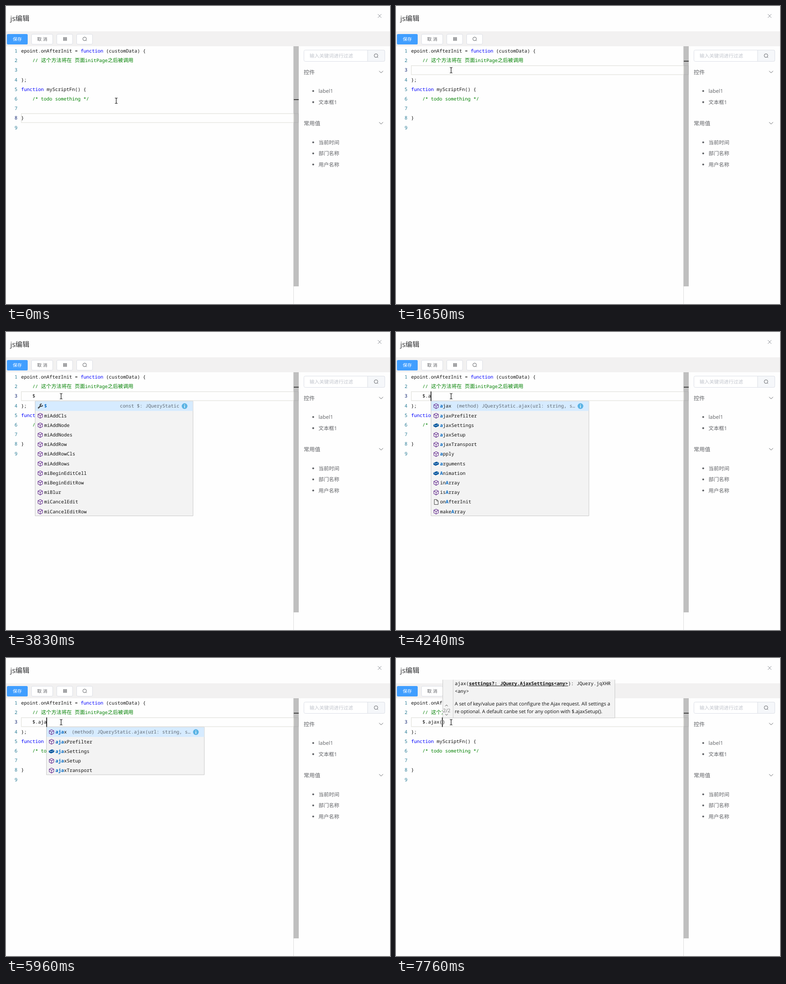
Recreate the animation shown at these times as an HTML page with a canvas. Size 850x659 px, loop 8000 ms.

```html
<!DOCTYPE html>
<html lang="zh-CN">
<head>
<meta charset="utf-8">
<title>js编辑</title>
<style>
html, body { margin: 0; width: 100%; height: 100%; overflow: hidden; background: #fefefe; }
canvas { display: block; width: 850px; height: 659px; }
</style>
</head>
<body>
<canvas id="stage" width="850" height="659"></canvas>
<script>
const ctx = document.getElementById('stage').getContext('2d');
const LOOP = 8000;
const CHAR = 6.27, WIDE = 11.4, ROW = 21.2, LEFT = 33.5;
const MONO = '"Noto Sans Mono", "DejaVu Sans Mono", monospace';
const SANS = '"Open Sans", "Noto Sans CJK SC", "Noto Sans CJK", sans-serif';
const CJK = '"Noto Sans CJK SC", "Noto Sans CJK", sans-serif';
const BLUE = '#0000ff', GREEN = '#008000', INK = '#111111', GREY = '#606266';

const rowY = n => 99.2 + ROW * (n - 1);

function box(x, y, w, h, fill, stroke, r = 0) {
  ctx.beginPath();
  ctx.roundRect(x, y, w, h, r);
  if (fill) { ctx.fillStyle = fill; ctx.fill(); }
  if (stroke) { ctx.strokeStyle = stroke; ctx.lineWidth = 1; ctx.stroke(); }
}

function path(points, color, width = 1, fill) {
  ctx.beginPath();
  points.forEach(([x, y], i) => i ? ctx.lineTo(x, y) : ctx.moveTo(x, y));
  if (fill) { ctx.closePath(); ctx.fillStyle = fill; ctx.fill(); }
  if (color) { ctx.strokeStyle = color; ctx.lineWidth = width; ctx.stroke(); }
}

function disc(x, y, r, fill, stroke) {
  ctx.beginPath();
  ctx.arc(x, y, r, 0, Math.PI * 2);
  if (fill) { ctx.fillStyle = fill; ctx.fill(); }
  if (stroke) { ctx.strokeStyle = stroke; ctx.lineWidth = 1; ctx.stroke(); }
}

function label(str, x, cy, size, color, align = 'left', weight = 400) {
  ctx.font = `${weight} ${size}px ${SANS}`;
  ctx.fillStyle = color;
  ctx.textAlign = align;
  ctx.fillText(str, x, cy + size * 0.37);
}

// Monospaced text with wide characters; returns the end position.
const isWide = s => /[\u3000-\uffff]/.test(s);
const runWidth = s => s.length * (isWide(s) ? WIDE : CHAR);
const runs = s => s.match(/[\u3000-\uffff]+|[^\u3000-\uffff]+/g) || [];
const codeWidth = s => runs(s).reduce((w, r) => w + runWidth(r), 0);

function code(str, x, cy, color = INK, weight = 400) {
  ctx.textAlign = 'left';
  ctx.fillStyle = color;
  for (const run of runs(str)) {
    ctx.font = isWide(run) ? `${weight} ${WIDE}px ${CJK}` : `${weight} 10.45px ${MONO}`;
    ctx.fillText(run, x, cy + 3.7);
    x += runWidth(run);
  }
  return x;
}

const lines = [
  [['epoint.onAfterInit = '], ['function', BLUE], [' (customData) {']],
  [['    // 这个方法将在 页面initPage之后被调用', GREEN]],
  [],
  [['};']],
  [['function', BLUE], [' myScriptFn() {']],
  [['    /* todo something */', GREEN]],
  [],
  [['}']],
  []
];

// Suggestion entries: icon letter, then name.
const toItems = s => s.split(' ').map(e => [e[0], e.slice(2)]);
const AJAX = 'm:ajax m:ajaxPrefilter f:ajaxSettings m:ajaxSetup m:ajaxTransport';
const AJAX_INFO = '(method) JQueryStatic.ajax(url: string, s…';
const globals = {
  info: 'const $: JQueryStatic',
  items: toItems('w:$ m:miAddCls m:miAddNode m:miAddNodes m:miAddRow m:miAddRowCls m:miAddRows ' +
    'm:miBeginEditCell m:miBeginEditRow m:miBlur m:miCancelEdit m:miCancelEditRow')
};
const members = {
  info: AJAX_INFO,
  items: toItems(AJAX + ' f:Animation m:apply f:arguments m:bind m:call f:caller m:camelCase')
};
const startA = {
  info: AJAX_INFO,
  items: toItems(AJAX + ' m:apply f:arguments f:Animation m:inArray m:isArray p:onAfterInit m:makeArray')
};
const ajaxOnly = { info: AJAX_INFO, items: toItems(AJAX) };

// Time, typed text, caret shown, suggestion list, prefix the list belongs to.
const steps = [
  [0, '', 0],
  [1130, '', 1], [1650, '', 0],
  [2180, '¥', 1], [2270, '¥。', 1], [2700, '¥', 1], [2880, '', 1],
  [3380, '$', 1], [3430, '$', 1, globals, '$'], [3830, '$', 0, globals, '$'],
  [4040, '$.', 1], [4100, '$.', 1, members, '$.'],
  [4210, '$.a', 1, members, '$.'], [4240, '$.a', 1, startA, '$.a'],
  [4300, '$.aj', 1, startA, '$.a'], [4330, '$.aj', 1, ajaxOnly, '$.aj'],
  [4390, '$.ajj', 1], [4820, '$.aj', 1], [4940, '$.a', 1], [5220, '$.', 1],
  [5720, '$.a', 1], [5780, '$.a', 1, startA, '$.a'],
  [5840, '$.aj', 1, ajaxOnly, '$.aj'], [5930, '$.aja', 1, ajaxOnly, '$.aj'],
  [5960, '$.aja', 1, ajaxOnly, '$.aja'],
  [6110, '$.ajax', 1, ajaxOnly, '$.aja'], [6140, '$.ajax', 1, ajaxOnly, '$.ajax'],
  [6630, '$.ajax', 0, ajaxOnly, '$.ajax'],
  [6810, '$.ajax()', 1], [7270, '$.ajax()', 0], [7760, '$.ajax()', 1]
];
const CLICK = 1130, TIP = 6900;

function magnifier(x, y) {
  disc(x, y, 4, null, GREY);
  path([[x + 2.8, y + 2.8], [x + 4.6, y + 4.6]], GREY);
}

function chevron(x, y, w, h, color) {
  path([[x - w, y - h], [x, y + h], [x + w, y - h]], color);
}

function drawFrame() {
  box(0, 0, 850, 659, '#fefefe');
  label('js编辑', 9.5, 27, 15.5, '#303133');
  path([[823, 18], [831, 26]], '#909399');
  path([[831, 18], [823, 26]], '#909399');

  box(0, 56, 850, 33, '#f2f1f1');
  box(2, 62, 46, 23, '#409eff', null, 2.5);
  label('保存', 25, 73.2, 10, '#fff', 'center', 500);
  for (const [x, w] of [[56.5, 47], [112.5, 35], [156.5, 35]]) box(x, 62.5, w, 22, '#fff', '#dcdfe6', 2.5);
  label('取 消', 80.3, 73.2, 10, GREY, 'center');
  for (let i = 0; i < 9; i++) box(126.8 + (i % 3) * 2.9, 69.3 + Math.floor(i / 3) * 2.7, 2.1, 1.9, '#505256');
  magnifier(174, 72.7);
}

function drawSidebar() {
  box(659.5, 97.5, 179, 25, '#fff', '#dcdfe6', 3);
  box(800.5, 97.5, 38, 25, '#f5f7fa', '#dcdfe6', [0, 3, 3, 0]);
  label('输入关键词进行过滤', 672, 109.8, 10.7, '#c0c4cc');
  magnifier(819, 109.7);
  for (const [name, y] of [['控件', 146.3], ['常用值', 259.5]]) {
    label(name, 659, y, 12.3, GREY);
    chevron(830.3, y - 0.5, 4.3, 2.2, GREY);
  }
  const entries = [['label1', 188], ['文本框1', 212.7], ['当前时间', 301.5], ['部门名称', 326], ['用户名称', 350.5]];
  for (const [name, y] of entries) {
    disc(680, y, 2.1, GREY);
    label(name, 691.7, y, 11.5, GREY);
  }
}

function drawEditor(text, active) {
  box(636, 89, 1, 570, '#dddddd');
  box(636.5, 89, 11.5, 531, '#bfbfbf');
  box(637, 87 + 17 * (active - 1), 11, 2, '#424242');
  const top = rowY(active) - 9.7;
  ctx.strokeStyle = '#e6e6e2';
  ctx.lineWidth = 1.5;
  ctx.strokeRect(34, top, 602.5, 19.8);
  path([[636.5, top], [647.3, top], [647.3, top + 19.8], [636.5, top + 19.8]], '#b0b0b0');

  lines.forEach((parts, i) => {
    const n = i + 1, y = rowY(n);
    code(String(n), 19, y, n === active ? '#0b216f' : '#237893');
    let x = LEFT;
    for (const [str, color] of parts) x = code(str, x, y, color);
  });
  code('    ' + text, LEFT, rowY(3));
}

function icon(kind, x, y) {
  if (kind === 'm') {
    const a = [x, y - 5.5], b = [x + 5, y - 3], c = [x + 5, y + 2.7], d = [x, y + 5.5], e = [x - 5, y + 2.7], f = [x - 5, y - 3];
    path([a, b, c, d, e, f, a], '#652d90', 1.1);
    path([f, [x, y - 0.3], b], '#652d90', 1.1);
    path([[x, y - 0.3], d], '#652d90', 1.1);
  } else if (kind === 'f') {
    path([[x - 6, y - 1.5], [x + 1, y - 4.5], [x + 6, y - 2.5], [x + 6, y + 1.5], [x - 1, y + 4.5], [x - 6, y + 2.2]], null, 1, '#00539c');
    path([[x - 5, y - 0.9], [x - 1, y + 0.8], [x + 5.2, y - 1.8]], '#e8f1f8', 0.9);
  } else if (kind === 'w') {
    path([[x - 4.8, y + 4.8], [x + 1.5, y - 1.3]], '#424242', 2.6);
    ctx.beginPath();
    ctx.arc(x + 2.4, y - 2.2, 2.6, -0.1, Math.PI * 1.6);
    ctx.lineWidth = 2;
    ctx.stroke();
  } else {
    path([[x - 4, y - 5.5], [x + 1.5, y - 5.5], [x + 4.5, y - 2.5], [x + 4.5, y + 5.5], [x - 4, y + 5.5], [x - 4, y - 5.5]], '#424242');
    path([[x + 1.3, y - 5.5], [x + 1.3, y - 2.3], [x + 4.5, y - 2.3]], '#424242');
  }
}

function drawList({ info, items }, prefix) {
  const x = Math.floor(LEFT + CHAR * 4 + codeWidth(prefix)) + 0.5, y = 153.3;
  const word = prefix.slice(prefix.indexOf('.') + 1);
  box(x, y - 0.3, 349.5, items.length * ROW - 0.8, '#f3f3f3', '#c8c8c8');
  box(x + 0.5, y, 348.5, ROW, '#d6ebff');
  items.forEach(([kind, name], i) => {
    const cy = y + ROW * (i + 0.49);
    icon(kind, x + 11.3, cy + 0.3);
    const at = name.search(new RegExp(i && name.startsWith('mi') ? '^' : word === 'a' ? '^[aA]|A' : '^'));
    const len = name.startsWith('mi') ? 0 : word.length;
    let tx = code(name.slice(0, at), x + 20, cy);
    tx = code(name.slice(at, at + len), tx, cy, '#0066bf', 700);
    code(name.slice(at + len), tx, cy);
  });
  const cy = y + ROW * 0.49;
  code(info, x + 319.3 - codeWidth(info), cy, '#5f6870');
  disc(x + 330.8, cy + 0.2, 6.3, '#5ab3e4');
  box(x + 330.1, cy - 3.5, 1.5, 1.5, '#fff');
  box(x + 330.1, cy - 1, 1.5, 5, '#fff');
}

function drawTip() {
  box(103, 48, 382, 85, '#f3f3f3');
  path([[103.5, 48], [103.5, 132.5], [484.5, 132.5], [484.5, 48]], '#c8c8c8');
  path([[126.5, 48], [126.5, 132]], '#cfcfcf');
  path([[109, 106.5], [111.8, 103.7], [114.6, 106.5]], '#424242');
  path([[109, 123.8], [111.8, 126.6], [114.6, 123.8]], '#424242');
  label('2/2', 112.2, 116, 10.8, '#777', 'center');
  const start = code('ajax(', 130.2, 56.3);
  const end = code('settings?: JQuery.AjaxSettings<any>', start, 56.3, INK, 700);
  box(start, 61.2, end - start, 1, INK);
  code('): JQuery.jqXHR', end, 56.3);
  code('<any>', 130.2, 73.3);
  label('A set of key/value pairs that configure the Ajax request. All settings a', 130, 100.7, 10.85, INK);
  label('re optional. A default canbe set for any option with $.ajaxSetup().', 130, 117.8, 10.85, INK);
}

const ease = (t, a, b) => {
  const p = Math.min(1, Math.max(0, (t - a) / (b - a)));
  return p * p * (3 - 2 * p);
};

function drawPointer(t) {
  const p = ease(t, 0, 630), q = ease(t, 750, 1110);
  const x = 244 - 128.5 * p + 6.5 * q, y = 209.5 - 46 * p - 21.5 * q;
  path([[x, y - 5.5], [x, y + 5.5]], '#222', 1.3);
  for (const s of [-1, 1]) path([[x - 3, y + 6 * s], [x - 0.8, y + 6 * s], [x, y + 5 * s], [x + 0.8, y + 6 * s], [x + 3, y + 6 * s]], '#222', 1.1);
}

function render(t) {
  const [, text, caret, list, prefix] = steps.findLast(s => s[0] <= t);
  ctx.textRendering = 'geometricPrecision';
  ctx.textBaseline = 'alphabetic';
  drawFrame();
  drawSidebar();
  drawEditor(text, t < CLICK ? 8 : 3);
  if (list) drawList(list, prefix);
  if (t >= TIP) drawTip();
  if (caret) box(LEFT + CHAR * 4 + codeWidth(text.replace(')', '')) - 0.7, 131.5, 1.6, 21, '#000');
  drawPointer(t);
}

const begin = performance.now();
function tick() {
  render((performance.now() - begin) % LOOP);
  requestAnimationFrame(tick);
}
tick();
</script>
</body>
</html>
```
